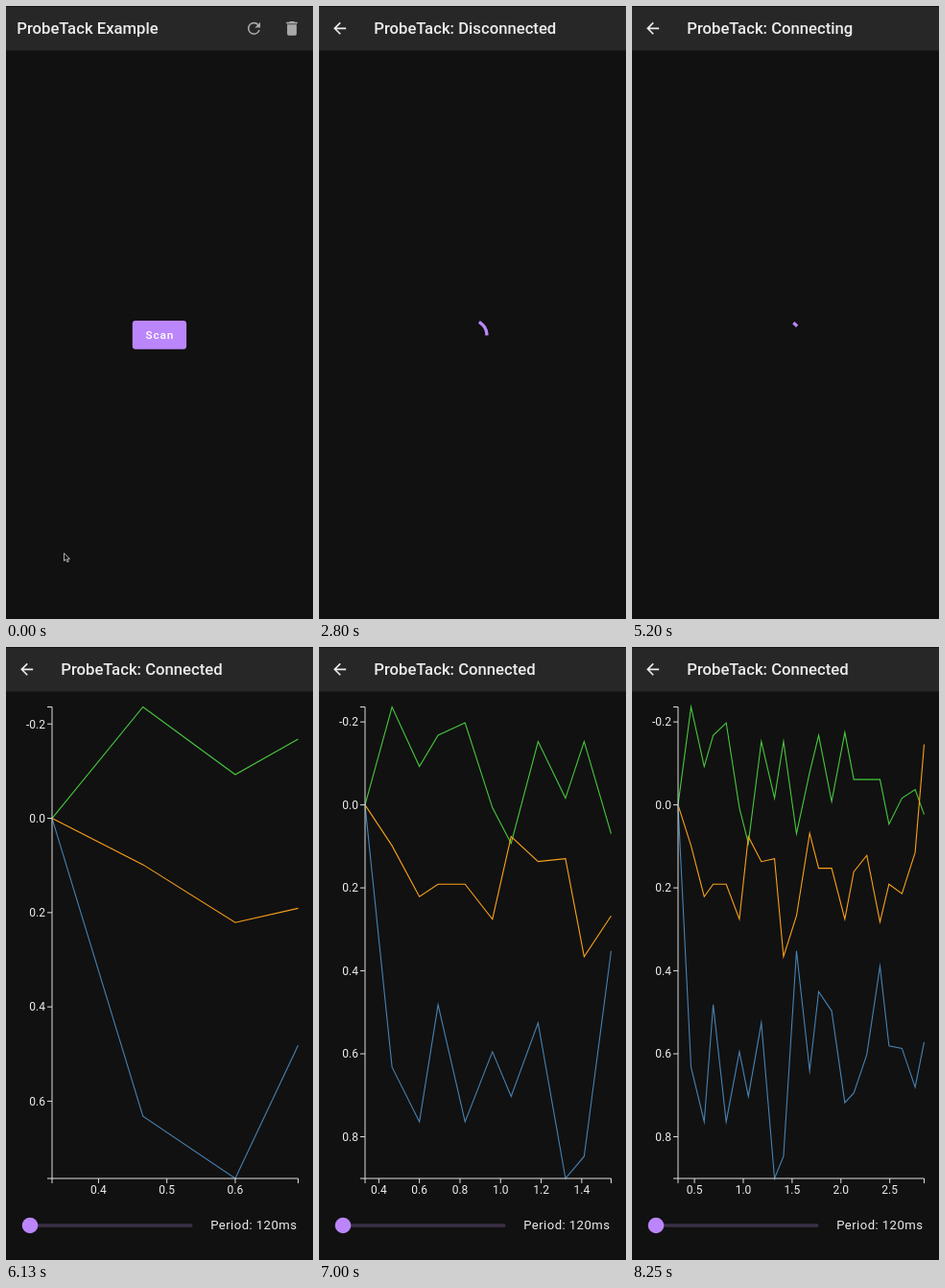
Recreate the animation shown at these times as an HTML page with a canvas. Size 320 by 639 pixels, loop 8.37 s.

```html
<!DOCTYPE html>
<html lang="en">
<head>
<meta charset="utf-8">
<title>Sensor reader demo</title>
<style>
html, body { margin: 0; width: 100%; height: 100%; overflow: hidden; background: #111; }
canvas { display: block; }
</style>
</head>
<body>
<canvas id="stage" width="320" height="639"></canvas>
<script>
const ctx = document.getElementById('stage').getContext('2d');
const LOOP = 8370, DEVICE = 'ProbeTack', ACCENT = '#bb86fc', LIGHT = '#ececec';
const TITLE_FONT = '500 16.68px';
const OPENED = 2650, CONNECTING = 3100, CONNECTED = 5400, CLOCK_START = 5395;

const ICONS = {
  refresh: new Path2D('M17.65 6.35A7.96 7.96 0 0 0 12 4a8 8 0 1 0 7.73 10h-2.08A6 6 0 1 1 12 6c1.66 0 3.14.69 4.22 1.78L13 11h7V4z'),
  trash: new Path2D('M19 4h-3.5l-1-1h-5l-1 1H5v2h14zM6 19a2 2 0 0 0 2 2h8a2 2 0 0 0 2-2V7H6z'),
  back: new Path2D('M20 11v2H8l5.5 5.5-1.42 1.42L4.16 12l7.92-7.92L13.5 5.5 8 11z')
};
const ARROW = new Path2D('M0 0V8L2 6.3L3.4 9.2L4.8 8.6L3.5 5.8H6Z');

// cursor stops: time, x, y
const STOPS = [[70, 60.5, 570.4], [270, 202, 414], [470, 202, 414], [540, 209, 419],
  [740, 165, 346], [870, 165, 346], [1070, 58, 80]];

// chart heights, 432 units per 1.0, zero at 165
const SERIES = [
  ['#46c83c', [165, 63, 125, 92.5, 79.5, 168, 205, 99, 158, 99, 195, 131, 92.5, 161.5, 89.5, 138.5, 138.5, 138.5, 185, 158, 149, 175]],
  ['#f9a01b', [165, 207.5, 260.5, 247.5, 247.5, 284, 198, 224, 221, 323, 280.5, 194.5, 231, 231, 284, 234.5, 217.5, 287, 247.5, 257.5, 214.5, 102]],
  ['#4682b4', [165, 438, 495, 373, 495, 422, 468.5, 392, 554, 531, 317, 442, 359.5, 379.5, 475, 465, 425, 333, 416, 418.5, 459, 412]]
].map(([color, ys]) => ({ color, values: ys.map(y => (y - 165) / 432) }));
const TIMES = SERIES[0].values.map((_, i) => 0.332 + 0.36 * Math.floor(i / 3) + [0, 0.133, 0.268][i % 3]);

function text(str, x, y, font, color = LIGHT, spacing = 0, align = 'left') {
  ctx.font = font + ' Roboto, sans-serif';
  ctx.letterSpacing = spacing + 'px';
  ctx.textAlign = align;
  ctx.fillStyle = color;
  ctx.fillText(str, x, y);
}

function icon(name, cx, color) {
  ctx.save();
  ctx.translate(cx - 9.84, 13.5);
  ctx.scale(0.82, 0.82);
  ctx.fillStyle = color;
  ctx.fill(ICONS[name]);
  ctx.restore();
}

function line(points, color, width = 1) {
  ctx.beginPath();
  points.forEach(([x, y]) => ctx.lineTo(x, y));
  ctx.strokeStyle = color;
  ctx.lineWidth = width;
  ctx.stroke();
}

function roundRect(x, y, w, h, r, color) {
  ctx.beginPath();
  ctx.roundRect(x, y, w, h, r);
  ctx.fillStyle = color;
  ctx.fill();
}

// y at x on a cubic curve whose y control values are 0, 0, 1, 1
function ease(x, x0, x1, x2, x3) {
  if (x <= x0) return 0;
  if (x >= x3) return 1;
  let lo = 0, hi = 1, s;
  for (let i = 0; i < 24; i++) {
    s = (lo + hi) / 2;
    const u = 1 - s;
    if (u * u * u * x0 + 3 * u * u * s * x1 + 3 * u * s * s * x2 + s * s * s * x3 < x) lo = s;
    else hi = s;
  }
  return s * s * (3 - 2 * s);
}

function spinner(age) {
  const p = age / 1333 % 1, base = 0.25 * p + age / 2222 - 0.25;
  const start = base + 0.75 * ease(p, 0.5, 0.7, 0.6, 1) - 0.003;
  const end = base + 0.75 * ease(p, 0, 0.2, 0.1, 0.5) + 0.005;
  ctx.beginPath();
  ctx.arc(160, 342.8, 14.9, start * 2 * Math.PI, end * 2 * Math.PI);
  ctx.strokeStyle = ACCENT;
  ctx.lineWidth = 3.3;
  ctx.lineCap = 'square';
  ctx.stroke();
  ctx.lineCap = 'butt';
}

function ticks([min, max]) {
  const raw = (max - min) / 5, power = Math.floor(Math.log10(raw)), err = raw / 10 ** power;
  const step = (err >= Math.sqrt(50) ? 10 : err >= Math.sqrt(10) ? 5 : err >= Math.SQRT2 ? 2 : 1) * 10 ** power;
  const digits = Math.max(0, -Math.floor(Math.log10(step) + 1e-9)), list = [];
  for (let i = Math.ceil(min / step); i * step <= max; i++) list.push([i * step, (i * step).toFixed(digits)]);
  return list;
}

function chart(count) {
  const L = 48, R = 304.5, T = 62.5, B = 554;
  const shown = SERIES.flatMap(s => s.values.slice(0, count));
  const xs = [TIMES[0], TIMES[count - 1]], ys = [Math.min(...shown), Math.max(...shown)];
  const px = v => L + (v - xs[0]) / (xs[1] - xs[0]) * (R - L);
  const py = v => T + (v - ys[0]) / (ys[1] - ys[0]) * (B - T);
  for (const s of SERIES) line(s.values.slice(0, count).map((v, i) => [px(TIMES[i]), py(v)]), s.color, 1.1);
  const axis = '#dedede';
  line([[43, T], [L, T], [L, B], [43, B]], axis);
  line([[L, B + 5], [L, B], [R, B], [R, B + 5]], axis);
  for (const [v, label] of ticks(ys)) {
    line([[43, py(v)], [L, py(v)]], axis);
    text(label, 41, py(v) + 4.3, '12px', LIGHT, 0, 'right');
  }
  for (const [v, label] of ticks(xs)) {
    line([[px(v), B], [px(v), B + 5]], axis);
    text(label, px(v), 570, '12px', LIGHT, 0, 'center');
  }
}

function cursor(t) {
  let i = STOPS.findIndex(s => s[0] > t);
  if (i < 0) i = STOPS.length;
  const a = STOPS[Math.max(0, i - 1)], b = STOPS[Math.min(i, STOPS.length - 1)];
  const k = a === b ? 0 : (t - a[0]) / (b[0] - a[0]);
  ctx.save();
  ctx.translate(a[1] + (b[1] - a[1]) * k, a[2] + (b[2] - a[2]) * k);
  ctx.fillStyle = '#000';
  ctx.fill(ARROW);
  ctx.strokeStyle = '#ddd';
  ctx.lineWidth = 0.8;
  ctx.stroke(ARROW);
  ctx.restore();
}

function home(t) {
  text(DEVICE + ' Example', 11.3, 29, TITLE_FONT);
  icon('refresh', 258.5, '#a9a9a9');
  icon('trash', 298, '#a9a9a9');
  if (t < 1330) {
    roundRect(131.8, 327.9, 56.3, 29.8, 3.3, ACCENT);
    text('Scan', 145.6, 346.8, '500 11.8px', '#fff', 0.8);
  }
  cursor(t);
}

function device(t) {
  const state = t < CONNECTING ? 'Disconnected' : t < CONNECTED ? 'Connecting' : 'Connected';
  icon('back', 21.6, LIGHT);
  text(`${DEVICE}: ${state}`, 57.3, 29, TITLE_FONT);
  if (t < CONNECTED) return spinner(t - OPENED);
  const count = TIMES.filter(s => s * 1000 <= t - CLOCK_START).length;
  if (count > 1) chart(count);
  roundRect(25, 601.2, 169.5, 3.5, 1.5, '#3b3047');
  roundRect(16.7, 594.7, 16.6, 16.6, 8.3, ACCENT);
  text('Period: 120ms', 213.2, 607.3, '13.1px', LIGHT, 0.45);
}

function draw(now) {
  const t = now % LOOP;
  ctx.fillStyle = '#111';
  ctx.fillRect(0, 0, 320, 639);
  ctx.fillStyle = '#272727';
  ctx.fillRect(0, 1, 320, 45.4);
  (t < OPENED ? home : device)(t);
  requestAnimationFrame(draw);
}
requestAnimationFrame(draw);
</script>
</body>
</html>
```
